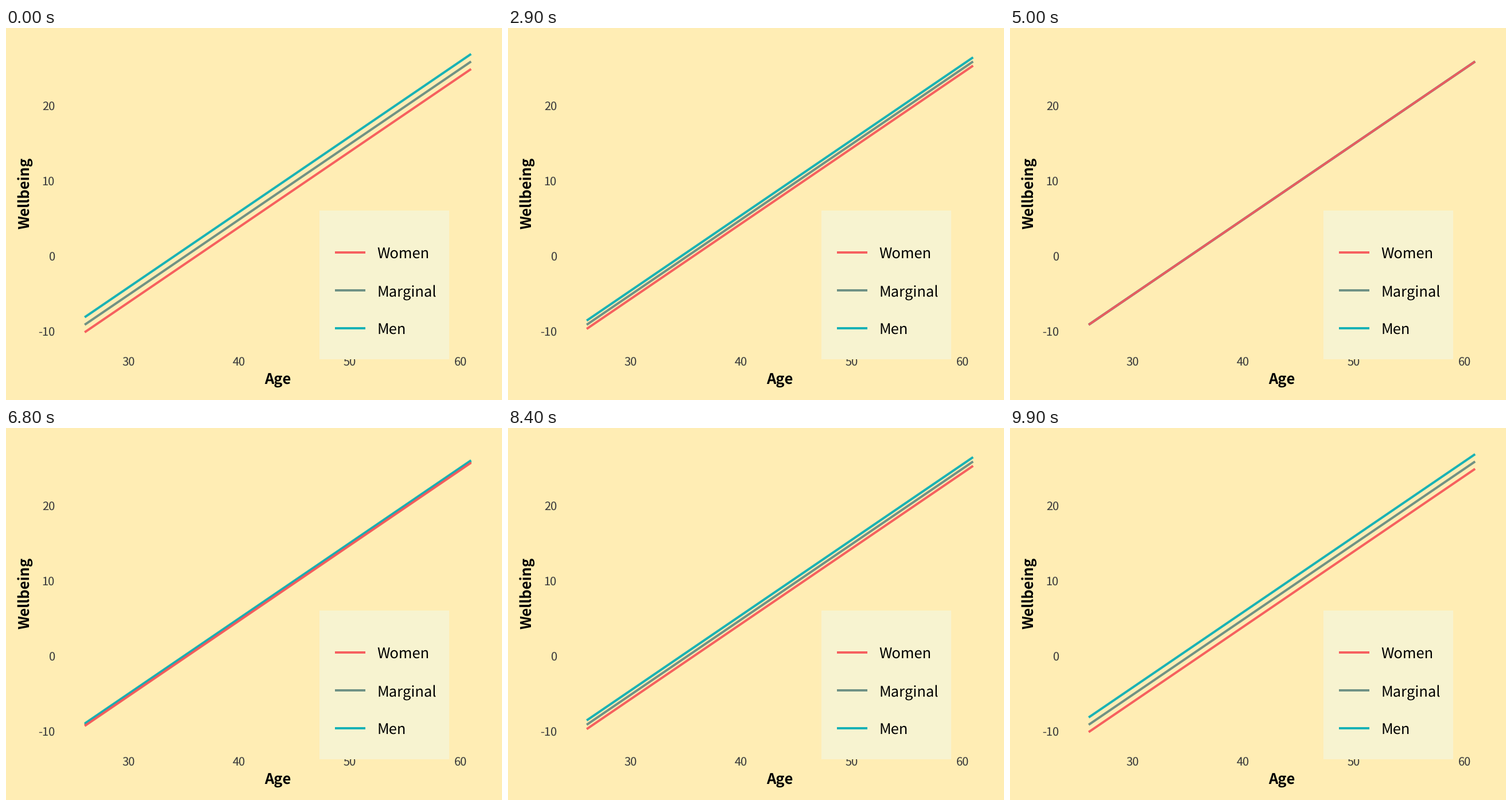
Recreate the animation shown at these times as a matplotlib script. Size 864 by 648 pixels, loop 10 s.

```python
import matplotlib.pyplot as plt
from matplotlib.animation import FuncAnimation
from matplotlib.patches import Rectangle

W, H, DPI = 864, 648, 72  # at 72 dpi one point is one pixel
FRAMES, INTERVAL = 100, 100
HOLD, MOVE = 12, 38  # frames at rest, frames in motion

BG, PANEL, GREY = "#ffedb4", "#f7f3d0", "#404040"
RED, SAGE, TEAL = "#f6585a", "#698d82", "#0cafb6"
LINE = dict(lw=4, alpha=0.95, solid_capstyle="butt")

plt.rcParams["font.family"] = ["Noto Sans CJK JP", "DejaVu Sans"]
plt.rcParams["text.hinting"] = "none"
plt.rcParams["text.hinting_factor"] = 1
plt.rcParams["axes.unicode_minus"] = False

fig = plt.figure(figsize=(W / DPI, H / DPI), dpi=DPI, facecolor=BG)
ax = fig.add_axes([0, 0, 1, 1])
ax.set_xlim(0, W)
ax.set_ylim(H, 0)
ax.axis("off")


def px(age):
    return 214 + (age - 30) * 19.23


def py(score):
    return 399 - score * 13.1


def label(x, y, text, size, **kw):
    kw = {"va": "baseline", "color": "black", **kw}
    return ax.text(x, y, text, fontsize=size, **kw)


# Axis labels and titles
for score in (-10, 0, 10, 20):
    label(85, py(score) + 6.5, str(score), 20, ha="right", color=GREY)
for age in (30, 40, 50, 60):
    label(px(age), 588.5, str(age), 20, ha="center", color=GREY)
label(473.5, 621, "Age", 25.5, ha="center", weight="bold")
label(40, 288, "Wellbeing", 25.5, ha="right", va="center", weight="bold",
      rotation=90, rotation_mode="default").set_visible(False)
ax.text(40, 288, "Wellbeing", fontsize=25.5, weight="bold", rotation=90,
        rotation_mode="anchor", ha="center", va="baseline")

# Legend, covering part of the axis labels
ax.add_patch(Rectangle((545.5, 318), 226.5, 259, fc=PANEL, lw=0, zorder=4))
legend = (("Women", RED), ("Marginal", SAGE), ("Men", TEAL))
for i, (name, color) in enumerate(legend):
    y = 391 + 66 * i
    ax.plot([573, 626], [y, y], color=color, zorder=5, **LINE)
    label(646, y + 11, name, 25.5, zorder=5)

# Trend lines: direction of each group's offset from the marginal line
ages = (26, 61)
xs = [px(a) for a in ages]
trends = []
for color, side in ((SAGE, 0), (TEAL, 1), (RED, -1)):
    line, = ax.plot(xs, [0, 0], color=color, zorder=3, **LINE)
    trends.append((line, side))


def gap(n):
    """Offset in score units: rest, close, rest, open."""
    half = HOLD + MOVE
    step = max(0, n % half - HOLD) / MOVE
    return 1 - step if n < half else step


def update(n):
    g = gap(n)
    for line, side in trends:
        line.set_ydata([py(a - 35 + side * g) for a in ages])
    return [line for line, _ in trends]


anim = FuncAnimation(fig, update, frames=FRAMES, interval=INTERVAL,
                     init_func=lambda: update(0), repeat=True, repeat_delay=0)
plt.show()
```
